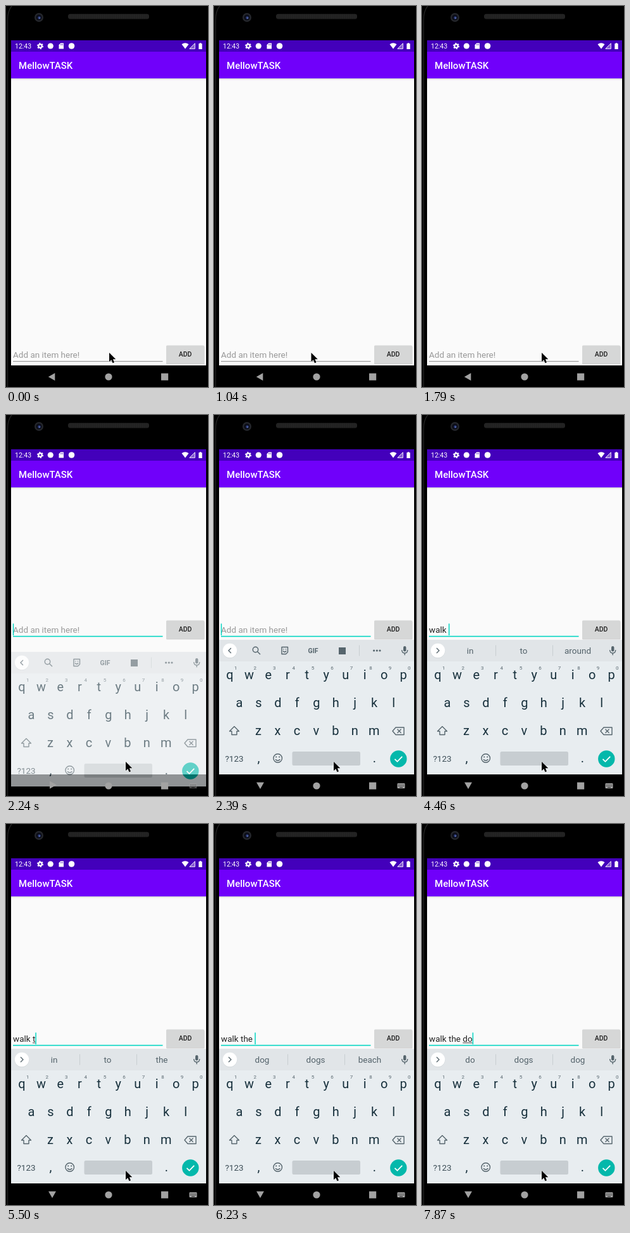
An HTML page for the animation above (8000 ms loop, 319x600 px).

```html
<!DOCTYPE html>
<html lang="en">
<head>
<meta charset="utf-8">
<title>To-do app</title>
<style>
html, body { margin: 0; width: 100%; height: 100%; overflow: hidden; background: #000; }
svg { display: block; width: 100vw; height: 100vh; }
text { font-family: Roboto, sans-serif; white-space: pre; }
.mid { text-anchor: middle; }
.key { font-size: 20px; fill: #17303c; text-anchor: middle; }
.num { font-size: 8px; fill: #596870; text-anchor: middle; }
.word { font-size: 13.5px; fill: #53626a; text-anchor: middle; }
.field { font-size: 13.5px; }
.line { fill: none; stroke: #56656d; stroke-width: 1.4; }
.solid { fill: #56656d; }
</style>
</head>
<body>
<svg viewBox="0 0 319 600" xmlns="http://www.w3.org/2000/svg">
  <defs>
    <linearGradient id="shade" x2="0" y2="1">
      <stop stop-color="#d6d6d6"/><stop offset="1" stop-color="#fafafa"/>
    </linearGradient>
    <pattern id="mesh" width="3" height="3" patternUnits="userSpaceOnUse">
      <rect width="3" height="3" fill="#262626"/><rect width="1.5" height="1.5" fill="#191919"/>
    </pattern>
  </defs>

  <!-- phone body -->
  <rect width="319" height="600"/>
  <path d="M2.5 600V22Q2.5 8 9 0" fill="none" stroke="#222" stroke-width="1.5"/>
  <circle cx="52" cy="18" r="7" fill="#25272c"/>
  <circle cx="52" cy="18" r="4.6" fill="#0b0d18"/>
  <circle cx="52.5" cy="18.5" r="2.2" fill="#2b3b78"/>
  <circle cx="53" cy="19" r=".8" fill="#8fa0dc"/>
  <rect x="98" y="12.5" width="128" height="8" rx="3.5" fill="url(#mesh)"/>

  <!-- app window -->
  <rect x="8" y="54" width="308" height="512" fill="#fafafa"/>
  <rect x="8" y="114" width="308" height="3" fill="url(#shade)"/>
  <rect x="8" y="54" width="308" height="18" fill="#4300bb"/>
  <rect x="8" y="72" width="308" height="42" fill="#7000fa"/>
  <text x="20" y="98.8" font-size="15" font-weight="500" fill="#fff">MellowTASK</text>
  <g fill="#fff">
    <text x="14" y="66.8" font-size="10.5">12:43</text>
    <circle cx="54" cy="63" r="2.7" fill="none" stroke="#fff" stroke-width="2.2"/>
    <circle cx="54" cy="63" r="4.3" fill="none" stroke="#fff" stroke-width="1.5" stroke-dasharray="2.2 2.3"/>
    <circle cx="70.3" cy="63" r="4.6"/>
    <path d="M86.2 58.5H91V67.5H83.5V61.2Z"/>
    <path d="M86.5 60v1.7M88 60v1.7M89.5 60v1.7" stroke="#4300bb" stroke-width=".7"/>
    <circle cx="103.5" cy="63" r="4.8"/>
    <path d="M277.5 60.3Q283 56 288.5 60.3L283 67.5Z"/>
    <path d="M298.5 58.5V67.5H289.5Z" fill-opacity=".35"/>
    <path d="M298.3 58.8V67.3H289.9Z" fill="none" stroke="#fff" stroke-width=".9"/>
    <path d="M304.3 59.3h1.4V58.2h2.6v1.1h1.4V68h-5.4Z"/>
  </g>

  <!-- entry row -->
  <g id="row">
    <rect x="253" y="535.5" width="60.5" height="29" rx="1.5" fill="#000" opacity=".16"/>
    <rect x="253" y="534.5" width="60" height="28.5" rx="1.5" fill="#d6d7d7"/>
    <text class="mid" x="283" y="552.2" font-size="10.5" font-weight="500" fill="#1f1f1f">ADD</text>
    <rect id="rule" x="11" width="236.5"/>
    <text class="field" id="entry" x="11" y="554"></text>
    <rect id="mark" y="555.2" height="1" fill="#444"/>
    <rect id="caret" y="539.5" width="1.5" height="18.5" fill="#03d5c2"/>
  </g>

  <!-- keyboard -->
  <g id="board">
    <rect x="8" y="354" width="308" height="212" fill="#e8edf0"/>
    <rect x="8" y="354" width="308" height="34" fill="#e1e5e8"/>
    <circle cx="25" cy="371.7" r="11.3" fill="#cfd4d7"/>
    <circle cx="25" cy="371" r="11.2" fill="#fff"/>
    <path class="line" id="chevron"/>
    <g id="tools">
      <circle class="line" cx="65.5" cy="369.5" r="4.2"/>
      <path class="line" d="M68.7 372.7L73 377" stroke-width="1.8"/>
      <path class="line" d="M107 365.5h9.5v8l-3 3H107Z" stroke-linejoin="round"/>
      <path class="line" d="M109 371.5q2.6 3.5 5.2 0M109.7 368.2v1.2M113.5 368.2v1.2" stroke-width="1.1"/>
      <text class="mid solid" x="156.5" y="375" font-size="10.5" font-weight="700">GIF</text>
      <rect class="solid" x="197" y="366" width="11" height="11"/>
      <path d="M229.5 362.5v17" stroke="#c8cdd0"/>
      <circle class="solid" cx="252.6" cy="371" r="1.6"/>
      <circle class="solid" cx="257.3" cy="371" r="1.6"/>
      <circle class="solid" cx="262" cy="371" r="1.6"/>
    </g>
    <g id="words">
      <path d="M116.5 362.5v17M206.5 362.5v17" stroke="#c8cdd0"/>
      <text class="word" x="76" y="376"></text>
      <text class="word" x="160.5" y="376"></text>
      <text class="word" x="246" y="376"></text>
    </g>
    <rect class="solid" x="299" y="364" width="4.4" height="8.5" rx="2.2"/>
    <path class="line" d="M296.7 370q0 5 4.5 5t4.5-5M301.2 375v3.2" stroke-width="1.2"/>
    <g id="keys"></g>
    <path class="line" d="M32 490.5L39.5 498H36v5.5H28V498H24.5Z" stroke-linejoin="round"/>
    <path class="line" d="M287 492h13v11.5H287l-5-5.7Z" stroke-linejoin="round"/>
    <path class="line" d="M289.5 494.8l6 6M295.5 494.8l-6 6"/>
    <text class="mid" x="32" y="546" font-size="13.5" fill="#3c4d56">?123</text>
    <circle class="line" cx="100.7" cy="540.5" r="6.8"/>
    <circle class="solid" cx="98.2" cy="538.5" r="1.1"/>
    <circle class="solid" cx="103.2" cy="538.5" r="1.1"/>
    <path class="line" d="M97 542.3q3.7 4 7.4 0" stroke-width="1.3"/>
    <rect x="123.5" y="530" width="107.5" height="22" rx="2.5" fill="#c7cdd1"/>
    <circle cx="291.3" cy="541.5" r="13.2" fill="#04b8ab"/>
    <path d="M285.5 541.8l4 4 7.7-8" fill="none" stroke="#fff" stroke-width="1.8"/>
  </g>

  <!-- navigation -->
  <g fill="#a2a2a2">
    <path id="back"/>
    <circle cx="162" cy="584" r="5.6"/>
    <rect x="245" y="578.5" width="11.2" height="11"/>
    <g id="imeIcon">
      <rect x="289.5" y="580" width="12" height="8" rx="1"/>
      <path d="M291 582.4h9M291 584.4h9" stroke="#111" stroke-width="1" stroke-dasharray="1 1"/>
      <path d="M293 586.5h5" stroke="#111" stroke-width=".8"/>
    </g>
  </g>
  <path id="pointer" d="M0 0V14.3L3.3 11.2 5.5 16.3 8 15.2 5.9 10.3H10.3Z" stroke="#fff" stroke-width="1" paint-order="stroke"/>
</svg>
<script>
const LOOP = 8000;
const $ = id => document.getElementById(id);
const attr = (el, values) => { for (const k in values) el.setAttribute(k, values[k]); };
const show = (el, on) => { el.style.display = on ? '' : 'none'; };

// Each track lists [start ms, value]; a value holds until the next start.
const at = (track, t) => track.reduce((v, step) => t >= step[0] ? step[1] : v, track[0][1]);

const pointerX = [[0, 163], [890, 157], [1040, 153.5], [1340, 160], [1490, 172], [1640, 183], [1790, 189]];
const typed = [[0, ''], [3880, 'w'], [4030, 'wa'], [4180, 'wal'], [4330, 'walk'], [4460, 'walk '],
  [5500, 'walk t'], [5940, 'walk th'], [6090, 'walk the'], [6230, 'walk the '], [7720, 'walk the d'], [7870, 'walk the do']];
const hints = [[0, ''], [4030, 'w was we'], [4180, 'wa was wait'], [4330, 'walk walked walking'], [4460, 'in to around'],
  [4610, 'in to the'], [5640, 't the to'], [5940, 'th the this'], [6090, 'the they them'],
  [6230, 'dog dogs beach'], [7870, 'do dogs dog']];
const caretOn = [[0, 0], [1940, 1], [2540, 0], [3140, 1], [3580, 0], [3880, 1], [4900, 0], [5500, 1], [6830, 0], [7280, 1]];

function addText(cls, x, y, str) {
  const el = document.createElementNS('http://www.w3.org/2000/svg', 'text');
  attr(el, { class: cls, x, y });
  el.textContent = str;
  $('keys').append(el);
}
[['qwertyuiop', 25, 415.5], ['asdfghjkl', 40, 459.8], ['zxcvbnm', 70, 503.8]].forEach(([row, x, y]) =>
  [...row].forEach((c, i) => addText('key', x + i * 30.45, y, c)));
[...'1234567890'].forEach((c, i) => addText('num', 34.3 + i * 30.45, 401, c));
addText('key', 70.5, 546.5, ',');
addText('key', 253.5, 546.5, '.');

const entry = $('entry');
const words = $('words').querySelectorAll('text');
const meter = document.createElement('canvas').getContext('2d');
const width = str => {
  meter.font = '13.5px Roboto, sans-serif';
  return meter.measureText(str).width;
};

function render(t) {
  const focus = t >= 1940, open = t >= 2240, sliding = open && t < 2390;
  const text = at(typed, t), hint = at(hints, t);

  attr($('pointer'), { transform: `translate(${at(pointerX, t)} 546)` });
  attr($('row'), { transform: `translate(0 ${open ? -211 : 0})` });
  attr($('rule'), focus ? { y: 558.8, height: 1.6, fill: '#03d5c2' } : { y: 559.2, height: 1, fill: '#858585' });
  entry.textContent = text || 'Add an item here!';
  attr(entry, { fill: text ? '#222' : '#999' });

  const start = text.lastIndexOf(' ') + 1;
  const from = 11 + width(text.slice(0, start)), end = 11 + width(text);
  attr($('mark'), { x: from, width: end - from });
  attr($('caret'), { x: end - (text ? 0 : .2) });
  show($('caret'), at(caretOn, t));

  show($('board'), open);
  attr($('board'), { transform: `translate(0 ${sliding ? 19 : 0})`, opacity: sliding ? .62 : 1 });
  show($('tools'), !hint);
  show($('words'), hint);
  hint.split(' ').forEach((w, i) => { words[i].textContent = w; });
  attr($('chevron'), { d: hint ? 'M23 367l4 4-4 4' : 'M27 367l-4 4 4 4' });

  attr($('back'), { d: sliding ? 'M69 576.5V588.5L80 582.5Z' : open ? 'M67 578.5H79L73 589Z' : 'M77.3 578V590L66.8 584Z' });
  show($('imeIcon'), open);
  attr($('imeIcon'), { opacity: sliding ? .45 : 1 });
}

function tick() {
  render(performance.now() % LOOP);
  requestAnimationFrame(tick);
}
tick();
</script>
</body>
</html>
```
